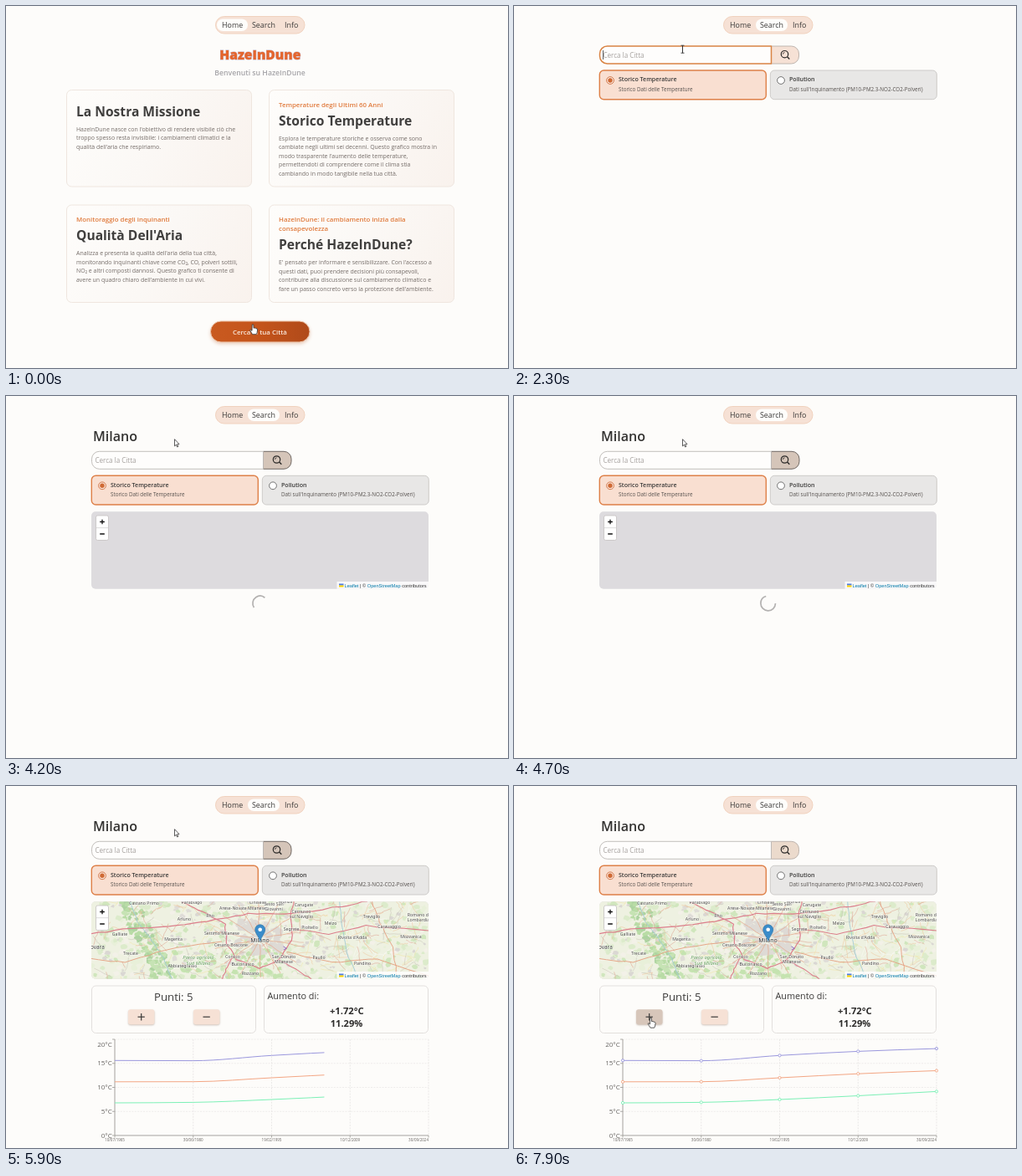
An HTML page with a canvas for the animation above (8 s loop, 600 px wide and 433 px high).

```html
<!DOCTYPE html>
<html lang="it">
<head>
<meta charset="utf-8">
<title>HazeInDune</title>
<style>
html, body { margin: 0; width: 100%; height: 100%; overflow: hidden; background: #fdfcfa; }
canvas { display: block; }
</style>
</head>
<body>
<canvas id="stage" width="600" height="433"></canvas>
<script>
const LOOP = 8000, STEP = 100;
const T = { search: 400, focus: 1200, type: 2500, submit: 4000, tiles: 5000, chart: 5317, blur: 7500 };
const SHIFT = 18.3;
const UI = '"Open Sans", "Noto Sans", sans-serif';
const INK = '#3b3a39', ORANGE = '#de8048', PEACH = '#f6e1d5';
const stage = document.getElementById('stage').getContext('2d');
let g = stage;

function box(x, y, w, h, r, fill, stroke, lw = 1) {
  g.beginPath();
  g.roundRect(x, y, w, h, r);
  if (fill) { g.fillStyle = fill; g.fill(); }
  if (stroke) { g.strokeStyle = stroke; g.lineWidth = lw; g.stroke(); }
}

function text(str, x, y, size, { color = INK, weight = 400, align = 'left', font = UI } = {}) {
  g.font = `${weight} ${size}px ${font}`;
  g.fillStyle = color;
  g.textAlign = align;
  g.fillText(str, x, y);
}

function path(points, color, lw) {
  g.beginPath();
  points.forEach(([x, y]) => g.lineTo(x, y));
  g.strokeStyle = color;
  g.lineWidth = lw;
  g.stroke();
}

function disc(x, y, r, fill, stroke, lw = 1) {
  g.beginPath();
  g.arc(x, y, r, 0, Math.PI * 2);
  if (fill) { g.fillStyle = fill; g.fill(); }
  if (stroke) { g.strokeStyle = stroke; g.lineWidth = lw; g.stroke(); }
}

function gradient(x0, y0, x1, y1, ...colors) {
  const fill = g.createLinearGradient(x0, y0, x1, y1);
  colors.forEach((c, i) => fill.addColorStop(i / (colors.length - 1), c));
  return fill;
}

function nav(home) {
  box(250.5, 12.5, 106.5, 20.5, 10.2, PEACH, '#f0cfb9', .9);
  home ? box(252, 15.5, 37, 14.5, 7.2, '#fefdfb') : box(289, 15.5, 38, 14.5, 7.2, '#fefdfb');
  text('Home', 258, 26, 8.9);
  text('Search', 294, 26, 8.9);
  text('Info', 333, 26, 8.9);
}

function infoCard(x, y, h, subs, title, lines, subY, titleY, bodyY) {
  box(x, y, 221, h, 6, gradient(x, y, x + 221, y + h, '#fefdfb', '#fbf8f5', '#f9f2ed'), '#efe6df');
  subs.forEach((s, i) => text(s, x + 11.5, subY + i * 11.6, 7.85, { weight: 600, color: '#e07a3c' }));
  text(title, x + 11.5, titleY, 15.6, { weight: 700, color: '#403f3e' });
  lines.forEach((s, i) => text(s, x + 11.5, bodyY + i * 10.45, 6.95, { color: '#736b67' }));
}

function homePage() {
  nav(true);
  g.font = `800 15.6px ${UI}`;
  g.textAlign = 'center';
  g.lineWidth = 1;
  g.strokeStyle = 'rgba(150,96,120,.55)';
  g.strokeText('HazeInDune', 303.8, 64);
  text('HazeInDune', 303.8, 64, 15.6, { weight: 800, align: 'center', color: '#e5652c' });
  text('Benvenuti su HazeInDune', 303.5, 82.7, 8.7, { weight: 600, align: 'center', color: '#a5a4a8' });

  infoCard(72.5, 100.5, 115.5, [], 'La Nostra Missione', [
    "HazeInDune nasce con l'obiettivo di rendere visibile ciò che",
    'troppo spesso resta invisibile: i cambiamenti climatici e la',
    "qualità dell'aria che respiriamo."], 0, 131.5, 149.7);
  infoCard(314.5, 100.5, 115.5, ['Temperature degli Ultimi 60 Anni'], 'Storico Temperature', [
    'Esplora le temperature storiche e osserva come sono',
    'cambiate negli ultimi sei decenni. Questo grafico mostra in',
    "modo trasparente l'aumento delle temperature,",
    'permettendoti di comprendere come il clima stia',
    'cambiando in modo tangibile nella tua città.'], 120.8, 143, 160.8);
  infoCard(72.5, 238, 116.5, ['Monitoraggio degli inquinanti'], "Qualità Dell'Aria", [
    "Analizza e presenta la qualità dell'aria della tua città,",
    'monitorando inquinanti chiave come CO₂, CO, polveri sottili,',
    'NO₂ e altri composti dannosi. Questo grafico ti consente di',
    "avere un quadro chiaro dell'ambiente in cui vivi."], 258, 280, 298.3);
  infoCard(314.5, 238, 116.5, ['HazeInDune: il cambiamento inizia dalla', 'consapevolezza'], 'Perché HazeInDune?', [
    "E' pensato per informare e sensibilizzare. Con l'accesso a",
    'questi dati, puoi prendere decisioni più consapevoli,',
    'contribuire alla discussione sul cambiamento climatico e',
    "fare un passo concreto verso la protezione dell'ambiente."], 257.6, 291.2, 309.3);

  g.save();
  g.shadowColor = 'rgba(190,100,50,.35)';
  g.shadowBlur = 4;
  g.shadowOffsetY = 2;
  box(244.5, 377, 118.5, 25, 12.5, gradient(244, 0, 363, 0, '#c95a20', '#c4541b', '#b04a1a'));
  g.restore();
  box(244.5, 377, 118.5, 25, 12.5, null, '#eec7ad');
  text('Cerca la tua Città', 303.5, 392.5, 7.9, { weight: 600, align: 'center', color: '#fbe9dd' });
}

function searchBar(t, y) {
  const focused = t >= T.focus && t < T.submit;
  const active = t >= T.submit && t < T.blur;
  const btnFill = active ? '#d5c5b9' : t >= T.blur ? '#ebdacc' : PEACH;
  box(307.5, y, 33 + active * .5, 21, [0, 9, 9, 0], btnFill, active ? '#625b56' : '#b8aea7', .9);
  box(102.5, y, 205, 21, [9, 0, 0, 9], '#fefdfc', focused ? '#d98444' : '#bcb8b5', focused ? 1.5 : .9);
  disc(323.5, y + 9.7, 4.2, null, '#2b2928', 1.2);
  path([[326.6, y + 12.8], [329.3, y + 15.5]], '#2b2928', 1.4);
  g.beginPath();
  g.arc(323.5, y + 9.7, 2.1, Math.PI, Math.PI * 1.5);
  g.strokeStyle = '#2b2928';
  g.lineWidth = .8;
  g.stroke();

  const count = focused ? Math.max(0, Math.min(6, Math.floor((t - T.type) / 75) + 1)) : 0;
  const typed = 'Milano'.slice(0, count);
  if (typed) text(typed, 106.5, y + 14, 8.05, { color: '#55504d' });
  else text('Cerca la Citta', 106.5, y + 14, 8.05, { color: '#a5a19e' });
  if (focused) {
    const lastKey = t < T.type ? T.focus : T.type + (count - 1) * 75;
    const lit = t < 3400 && Math.floor((t - lastKey) / 530) % 2 === 0;
    const x = 106.5 + (typed ? g.measureText(typed).width : 0);
    if (lit) path([[x, y + 5], [x, y + 16]], '#333', .8);
  }
}

function option(x, y, on, title, note) {
  box(x, y, 199, 34.7, 5, on ? '#f9dfd1' : '#e8e7e6', on ? ORANGE : '#c9c7c5', on ? 1.4 : .9);
  disc(x + 12.7, y + 12, 4.4, on ? '#fbe6dc' : '#fff', on ? '#cf7040' : '#666', .9);
  if (on) disc(x + 12.7, y + 12, 2.7, '#cf6a35');
  text(title, x + 22.7, y + 13.2, 7.05, { weight: 600 });
  text(note, x + 22.7, y + 24.8, 6.25, { color: '#55504d' });
}

function random(seed) {
  return () => (seed = (seed * 16807) % 2147483647) / 2147483647;
}

const TOWNS = `Castano Primo,165,142|Parabiago,222,141|Arese-Novate Milanese,283,148|Sesto San,320,143|Giovanni,320,149
Carugate,356,144|Cernusco,353,152|sul Naviglio,353,158|Treviglio,437,158|Caravaggio,458,170|Romano di,493,156
Lombardia,493,162|Rivolta d'Adda,414,183|Galliate,136,179|Magenta,200,185|Trecate,149,202|Settimo Milanese,258,178
Cesano Boscone,269,192|Corsico,271,206|Segrate,341,173|San Donato,332,206|Milanese,332,212|Abbiategrasso,211,217
Buccinasco,283,215|Rozzano,292,226|Pioltello,363,171|Melzo,388,166|Paullo,374,207|Pandino,426,214|Arluno,213,161
Cinisello,301,141|Rho,244,157|Monza,334,140|Mozzanica,484,182`.split(/[|\n]/).map(s => s.split(','));

function paintMap() {
  const rnd = random(4127), at = (a, b) => a + rnd() * (b - a);
  const blob = (x, y, r, color) => {
    g.beginPath();
    for (let i = 0; i < 9; i++) {
      const a = i / 9 * Math.PI * 2, d = r * at(.55, 1.2);
      g.lineTo(x + Math.cos(a) * d * 1.2, y + Math.sin(a) * d);
    }
    g.fillStyle = color;
    g.fill();
  };
  const road = (points, color, lw) => {
    const wavy = [];
    for (let i = 1; i < points.length; i++) {
      const [x0, y0] = points[i - 1], [x1, y1] = points[i];
      for (let k = 0; k < 5; k++) {
        wavy.push([x0 + (x1 - x0) * k / 5 + at(-.8, .8), y0 + (y1 - y0) * k / 5 + at(-.8, .8)]);
      }
    }
    wavy.push(points[points.length - 1]);
    path(wavy, color, lw);
  };
  g.fillStyle = '#eef1e1';
  g.fillRect(102, 138, 404, 93);
  for (let i = 0; i < 480; i++) {
    blob(at(102, 505), at(138, 231), at(1.5, 4.5), ['#dcebcb', '#e8f0d9', '#f3f1e8', '#d0e6bd'][i % 4]);
  }
  for (let i = 0; i < 110; i++) {
    const k = rnd(), spread = at(-13, 13);
    blob(145 + k * 46 + spread, 140 + k * 91, at(1.5, 4), ['#b9dca6', '#c6e3b4', '#add3a0'][i % 3]);
  }
  for (let i = 0; i < 60; i++) blob(at(195, 330), at(196, 231), at(1.5, 4), '#c5e3b0');
  for (let i = 0; i < 90; i++) blob(at(200, 385), at(138, 215), at(1, 3.5), '#dfdcd7');
  for (let i = 0; i < 40; i++) blob(303 + at(-27, 27), 181 + at(-19, 19), at(3, 6), '#dedad5');
  for (let i = 0; i < 60; i++) blob(at(105, 503), at(140, 229), at(1, 2.8), '#dad7d3');
  for (let i = 0; i < 300; i++) {
    const x = at(102, 505), y = at(138, 231), a = at(0, 6.3), d = at(6, 24);
    road([[x, y], [x + Math.cos(a) * d, y + Math.sin(a) * d]],
      ['#fbfaf6', '#c9c4b8', '#f1e5a8', '#efc79c', '#dfa491'][i % 5], .55);
  }
  for (let i = 0; i < 14; i++) {
    const a = i * Math.PI / 7 + .2;
    road([[303 + Math.cos(a) * 8, 183 + Math.sin(a) * 6], [303 + Math.cos(a) * 55, 183 + Math.sin(a) * 46]], '#e5ad92', .8);
  }
  road([[148, 138], [157, 162], [175, 185], [188, 206], [199, 231]], '#a3cbd5', .9);
  road([[398, 138], [402, 170], [407, 198], [421, 231]], '#a3cbd5', .9);
  const motorway = '#dc7f8c', trunk = '#e59f7f';
  road([[102, 177], [150, 170], [205, 167], [250, 160], [290, 153], [342, 153], [402, 144], [432, 138]], motorway, 1.2);
  road([[210, 138], [235, 151], [262, 165], [264, 188], [275, 207], [303, 218], [326, 208], [342, 184], [340, 156], [344, 138]], motorway, 1.2);
  road([[342, 171], [386, 178], [430, 167], [505, 173]], motorway, 1.1);
  road([[326, 208], [346, 219], [365, 231]], motorway, 1.1);
  road([[271, 205], [263, 219], [258, 231]], motorway, 1.1);
  road([[102, 207], [142, 211], [190, 196], [258, 186]], trunk, .9);
  road([[335, 199], [390, 211], [444, 207], [505, 227]], trunk, .9);
  road([[437, 138], [447, 163], [462, 193], [468, 231]], trunk, .9);

  const label = (s, x, y, size, color, weight = 400) => {
    g.font = `${weight} ${size}px "Noto Sans", sans-serif`;
    g.textAlign = 'center';
    g.lineWidth = 1.2;
    g.strokeStyle = 'rgba(255,255,255,.6)';
    g.strokeText(s, x, y);
    g.fillStyle = color;
    g.fillText(s, x, y);
  };
  TOWNS.forEach(([s, x, y]) => label(s, +x, +y, 5.2, '#4b4947'));
  label('Novara', 107, 195, 6.4, '#444');
  label('Parco agricolo', 230, 207, 5.8, '#5e9a54', 'italic 400');
  label('Sud Milano', 230, 214, 5.8, '#5e9a54', 'italic 400');
  label('Milano', 303.5, 186.5, 7, '#333');
  path([[331.5, 192], [335.2, 194.2], [331.8, 196]], '#8461c4', .9);
}

const mapLayer = document.createElement('canvas');
mapLayer.width = 600;
mapLayer.height = 433;
g = mapLayer.getContext('2d');
paintMap();
g = stage;

function pin(x, y) {
  g.beginPath();
  g.moveTo(x, y);
  g.bezierCurveTo(x - 2, y - 6, x - 6, y - 9.5, x - 6, y - 13.7);
  g.arc(x, y - 13.7, 6, Math.PI, 0);
  g.bezierCurveTo(x + 6, y - 9.5, x + 2, y - 6, x, y);
  g.fillStyle = '#3a8cca';
  g.fill();
  g.strokeStyle = '#2f74aa';
  g.lineWidth = .7;
  g.stroke();
  disc(x, y - 13.7, 2.3, '#fff');
}

function map(t) {
  g.save();
  g.beginPath();
  g.roundRect(102, 138.3, 403, 92.5, 5);
  g.clip();
  g.fillStyle = '#dddbde';
  g.fillRect(102, 138, 404, 94);
  const shown = Math.max(0, Math.min(1, (t - T.tiles + 100) / 200));
  g.globalAlpha = shown;
  g.drawImage(mapLayer, 0, 0);
  if (shown) pin(303.7, 185.5);
  g.globalAlpha = 1;
  box(107.5, 143, 15, 29.5, 2, '#fff', '#c4c1c0', .8);
  path([[108, 157.7], [122, 157.7]], '#ccc', .7);
  path([[112.2, 150.5], [117.8, 150.5]], '#111', 1.3);
  path([[115, 147.7], [115, 153.3]], '#111', 1.3);
  path([[112.2, 165], [117.8, 165]], '#111', 1.3);
  g.fillStyle = 'rgba(255,255,255,.82)';
  g.fillRect(395.5, 222, 110, 9);
  g.fillStyle = '#4c7be1';
  g.fillRect(398, 224.5, 5.5, 2);
  g.fillStyle = '#ffd500';
  g.fillRect(398, 226.5, 5.5, 2);
  let x = 404.5;
  [['Leaflet', '#0078a8'], [' | © ', '#333'], ['OpenStreetMap', '#0078a8'], [' contributors', '#333']].forEach(([s, color]) => {
    text(s, x, 228.6, 5.65, { color, font: '"Liberation Sans", Arial, sans-serif' });
    x += g.measureText(s).width;
  });
  g.restore();
}

function spinner(t) {
  const age = t - 3738, p = age % 1500 / 1500, unit = Math.PI * 2 / 59.7;
  const grow = Math.min(1, p / .475), slide = Math.max(0, Math.min(1, (p - .475) / .475));
  const start = age / 2000 * Math.PI * 2 + (16 * grow + 43 * slide) * unit;
  g.beginPath();
  g.arc(303.7, 248, 8.8, start, start + 42 * grow * unit);
  g.strokeStyle = '#b3b1b0';
  g.lineWidth = 1.7;
  g.stroke();
}

function stats(t) {
  box(102.5, 239, 196, 56.5, 5, null, '#dfdcda', .9);
  box(308.5, 239, 196, 56.5, 5, null, '#dfdcda', .9);
  text('Punti: 5', 200.3, 257, 13.2, { align: 'center' });
  text('Aumento di:', 312.5, 255, 10.8);
  text('+1.72°C', 407.3, 273.3, 11.2, { weight: 700, align: 'center', color: '#2c2b2a' });
  text('11.29%', 407, 288.4, 11.1, { weight: 700, align: 'center', color: '#2c2b2a' });
  const hover = cursorAt(t).y > 268;
  [[146, hover ? '#d7c6ba' : PEACH], [224, PEACH]].forEach(([x, fill]) => {
    g.save();
    g.shadowColor = 'rgba(120,90,70,.35)';
    g.shadowBlur = 2;
    g.shadowOffsetY = 1;
    box(x, 267.3, 31.5, 18, 3, fill);
    g.restore();
    path([[x + 11.5, 276.2], [x + 19.8, 276.2]], INK, 1.2);
    if (x < 200) path([[x + 15.7, 272], [x + 15.7, 280.4]], INK, 1.2);
  });
}

function bezierEase(p) {
  const curve = (a, b, u) => 3 * a * u * (1 - u) ** 2 + 3 * b * u * u * (1 - u) + u ** 3;
  let lo = 0, hi = 1;
  for (let i = 0; i < 20; i++) {
    const mid = (lo + hi) / 2;
    curve(.25, .25, mid) < p ? lo = mid : hi = mid;
  }
  return curve(.1, 1, lo);
}

const SERIES = [
  ['#9a97dd', [328.3, 328.6, 322.3, 317.4, 314.1]],
  ['#f3a684', [353.8, 353.7, 349, 344.2, 340.5]],
  ['#7cf0b6', [379, 378.4, 375, 370.5, 365.4]]
];
const DX = 93.75, tickX = i => 130 + i * DX;

function monotone(ys) {
  const s = ys.slice(1).map((y, i) => (y - ys[i]) / DX), last = s.length - 1;
  const m = ys.map((_, i) => {
    if (!i || i > last) return 0;
    const a = s[i - 1], b = s[i];
    return (Math.sign(a) + Math.sign(b)) * Math.min(Math.abs(a), Math.abs(b), Math.abs(a + b) / 4);
  });
  m[0] = (3 * s[0] - m[1]) / 2;
  m[last + 1] = (3 * s[last] - m[last]) / 2;
  g.beginPath();
  g.moveTo(130, ys[0]);
  s.forEach((_, i) => g.bezierCurveTo(
    tickX(i) + DX / 3, ys[i] + m[i] * DX / 3,
    tickX(i + 1) - DX / 3, ys[i + 1] - m[i + 1] * DX / 3,
    tickX(i + 1), ys[i + 1]));
}

function chart(t) {
  g.setLineDash([2, 1.4]);
  for (let i = 0; i < 5; i++) {
    if (i) path([[tickX(i), 303], [tickX(i), 418]], '#e6e4e2', .8);
    if (i < 4) path([[130, 303 + i * 28.75], [505, 303 + i * 28.75]], '#ebe9e7', .8);
  }
  g.setLineDash([]);
  path([[130, 303], [130, 418], [505, 418]], '#9a9794', .9);
  ['10/07/1965', '30/06/1980', '19/02/1995', '10/12/2009', '30/09/2024'].forEach((date, i) => {
    const y = 303 + i * 28.75, x = tickX(i);
    path([[127, y], [130, y]], '#9a9794', .8);
    path([[x, 418], [x, 420.5]], '#9a9794', .8);
    text(`${20 - i * 5}°C`, 126.8, i ? y + 2.6 : 311.6, 8, { align: 'right', color: '#666361' });
    text(date, i < 4 ? x : 505, 424.9, 4.5, { align: i < 4 ? 'center' : 'right', color: '#666361' });
  });
  const p = Math.min(1, (t - T.chart) / 1500);
  g.save();
  g.beginPath();
  g.rect(129, 300, 1 + 376 * bezierEase(p), 120);
  g.clip();
  SERIES.forEach(([color, ys]) => {
    monotone(ys);
    g.strokeStyle = color;
    g.lineWidth = 1;
    g.stroke();
  });
  g.restore();
  if (p === 1) SERIES.forEach(([color, ys]) => ys.forEach((y, i) => disc(tickX(i), y, 1.6, '#fff', color, .9)));
}

function searchPage(t) {
  const found = t >= T.submit, shift = found ? SHIFT : 0;
  nav(false);
  searchBar(t, 48 + shift);
  option(102.3, 77 + shift, true, 'Storico Temperature', 'Storico Dati delle Temperature');
  option(306.3, 77 + shift, false, 'Pollution', "Dati sull'Inquinamento (PM10-PM2.3-NO2-CO2-Polveri)");
  if (!found) return;
  text('Milano', 104, 54.3, 16, { weight: 600, color: '#333231' });
  map(t);
  if (t < T.chart) return spinner(t);
  stats(t);
  chart(t);
}

const MOVES = [[0, 295, 381], [400, 295, 381], [1000, 206, 61], [1200, 206, 61], [1400, 201.5, 51.7],
  [6400, 201.5, 51.7], [6800, 212, 208], [7300, 163.5, 277.5], [LOOP, 163.5, 277.5]];

function cursorAt(t) {
  const i = MOVES.findIndex(m => m[0] > t);
  const [t0, x0, y0] = MOVES[i - 1], [t1, x1, y1] = MOVES[i];
  const p = (t - t0) / (t1 - t0), e = p * p * (3 - 2 * p);
  return { x: x0 + (x1 - x0) * e, y: y0 + (y1 - y0) * e };
}

function shape(points, x, y) {
  g.beginPath();
  points.forEach(([dx, dy]) => g.lineTo(x + dx, y + dy));
  g.closePath();
  g.lineJoin = 'round';
  g.fillStyle = '#fff';
  g.fill();
  g.strokeStyle = '#333';
  g.lineWidth = .8;
  g.stroke();
}

const ARROW = [[0, 0], [0, 8.2], [1.9, 6.6], [3.1, 9.3], [4.3, 8.8], [3.1, 6.1], [5.5, 5.9]];
const HAND = [[-.8, 0], [.8, 0], [1, 4.2], [2.4, 4], [3.6, 4.6], [5, 5], [5.6, 6], [5.1, 9.6], [4.2, 11.7],
  [-.4, 11.7], [-2.2, 9], [-3.4, 6.6], [-2.6, 6.2], [-1, 7.4]];
const GRAB = [[-2.6, -3.6], [-1.6, -3.9], [-.7, -2.6], [-.3, -4.6], [.9, -4.6], [1.3, -2.6], [2.2, -3.9], [3, -3.4],
  [3.1, -1.4], [4.2, -2], [4.6, -1.2], [3.9, 2.2], [2.8, 4.6], [-1.7, 4.6], [-3.2, 2], [-4.7, .2], [-3.9, -.5], [-2, .7]];

function cursor(t) {
  const { x, y } = cursorAt(t), shift = t >= T.submit ? SHIFT : 0;
  const within = (x0, y0, x1, y1) => x > x0 && x < x1 && y > y0 && y < y1;
  if (t < T.search) return shape(HAND, x, y);
  if (within(102, 48 + shift, 307, 69 + shift)) {
    path([[x - 2, y - 4.5], [x + 2, y - 4.5]], '#333', .9);
    path([[x, y - 4.5], [x, y + 4.5]], '#333', 1);
    path([[x - 2, y + 4.5], [x + 2, y + 4.5]], '#333', .9);
  } else if (within(102, 77 + shift, 505, 112 + shift)) shape(HAND, x, y);
  else if (shift && within(102, 138, 505, 231)) shape(GRAB, x, y);
  else if (shift && within(146, 267, 178, 286)) shape(HAND, x, y);
  else shape(ARROW, x, y);
}

function frame(now) {
  const t = Math.floor(now % LOOP / STEP) * STEP;
  g.fillStyle = '#fdfcfa';
  g.fillRect(0, 0, 600, 433);
  t < T.search ? homePage() : searchPage(t);
  cursor(t);
  requestAnimationFrame(frame);
}
requestAnimationFrame(frame);
</script>
</body>
</html>
```
